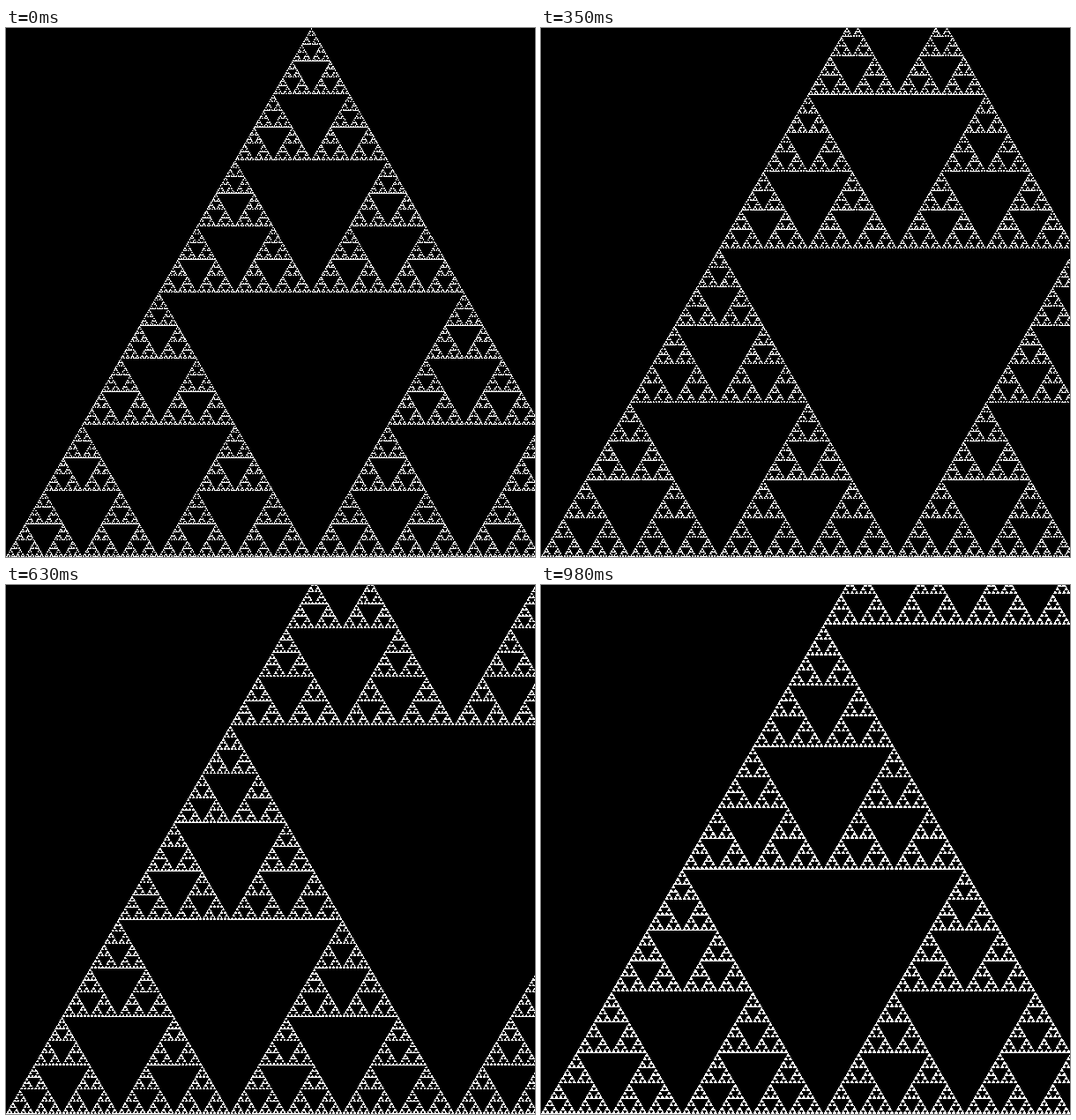
An HTML page with a canvas for the animation above (1050 ms loop, 600 px wide and 600 px high).

```html
<!DOCTYPE html>
<html>
<head>
<meta charset="utf-8">
<style>
html, body { margin: 0; height: 100%; overflow: hidden; background: #000; }
canvas { display: block; }
</style>
</head>
<body>
<canvas id="stage" width="600" height="600"></canvas>
<script>
const SIZE = 600, LEAVES = 256, STEP = 70, STEPS = 15;
const ctx = document.getElementById("stage").getContext("2d");
const image = ctx.createImageData(SIZE, SIZE);
const pixels = new Uint32Array(image.data.buffer);
const WHITE = 0xffffffff, BLACK = 0xff000000;

// Eased zoom about the bottom left corner, cut off before it settles.
const zoom = step => 1 + (1 - Math.cos(0.8 * Math.PI * step / STEPS)) / 2;

// Sample a Sierpinski triangle of filled leaves at each pixel centre.
function draw(step) {
  const height = SIZE * zoom(step);
  const side = height * 2 / Math.sqrt(3);
  for (let y = 0, i = 0; y < SIZE; y++) {
    const up = (SIZE - y - 0.5) / height * LEAVES;
    const b = Math.floor(up);
    for (let x = 0; x < SIZE; x++, i++) {
      const along = (x + 0.5) / side * LEAVES - up / 2;
      const a = Math.floor(along);
      const c = Math.floor(LEAVES - along - up);
      const filled = a >= 0 && c >= 0 && a + b + c === LEAVES - 1 && (a & b) === 0;
      pixels[i] = filled ? WHITE : BLACK;
    }
  }
  ctx.putImageData(image, 0, 0);
}

let shown = 0;
const start = performance.now();
function tick() {
  const elapsed = Math.max(0, performance.now() - start);
  const step = Math.floor(elapsed / STEP) % STEPS;
  if (step !== shown) draw(shown = step);
  requestAnimationFrame(tick);
}
draw(0);
requestAnimationFrame(tick);
</script>
</body>
</html>
```
